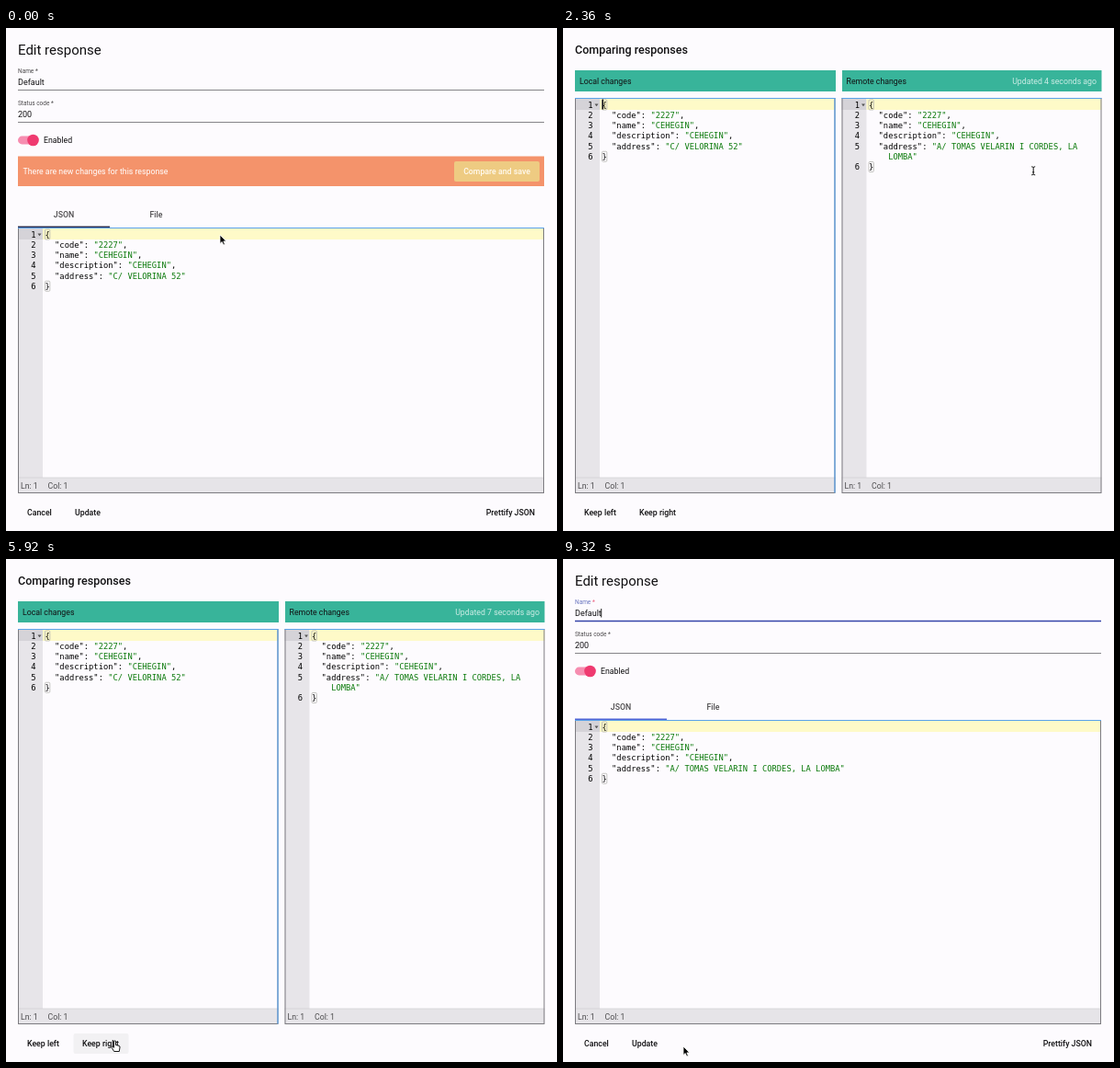
An HTML page for the animation above (9360 ms loop, 600 by 547 pixels).

```html
<!DOCTYPE html>
<html lang="en">
<head>
<meta charset="utf-8">
<title>Compare responses</title>
<style>
  html, body { margin: 0; width: 100%; height: 100%; overflow: hidden; background: #fdfbfe; }
  svg { display: block; width: 100%; height: 100%; }
  text { font-family: Roboto, Arial, sans-serif; font-size: 8.75px; fill: #111012; }
  .code { font-family: "DejaVu Sans Mono", monospace; font-size: 8.79px; fill: #000; }
  .string { fill: #0b7a0b; }
  .strong { font-weight: 500; }
  .sheet { fill: #fdfbfe; filter: drop-shadow(0 6px 9px #0006); }
  .frame { fill: none; stroke: #7c7b80; }
  .glow .frame { stroke: #58aee6; }
  .thumb { fill: #ef3a70; }
  .track { fill: #f68db0; }
  .off .thumb { fill: #fafafa; stroke: #bbb; stroke-width: .5; }
  .off .track { fill: #8f8e92; }
  .focused .nameLabel { fill: #3949ab; }
  .focused .star { fill: #e5264f; }
  .focused .nameLine { stroke: #3443a8; stroke-width: 1.6; }
</style>
</head>
<body>
<svg id="stage" viewBox="0 0 600 547" preserveAspectRatio="none"></svg>
<script>
const LOOP = 9360, OPEN_MS = 150, CLOSE_MS = 75;
const COMPARE_OPEN = 1970, LOADED = 2300, COMPARE_CLOSE = 6420, EDIT_OPEN = 6550, FOCUS = 6900;
const GREEN = '#38b49a', AMBER = '#f0bd72';

const text = (x, y, content, attrs = '') => `<text x="${x}" y="${y}" ${attrs}>${content}</text>`;
const rect = (x, y, w, h, fill, attrs = '') =>
  `<rect x="${x}" y="${y}" width="${w}" height="${h}" fill="${fill}" ${attrs}/>`;
const line = (x1, y, x2, color, attrs = '') =>
  `<path d="M${x1} ${y}H${x2}" stroke="${color}" ${attrs}/>`;
const strong = 'class="strong"', middle = 'text-anchor="middle"', end = 'text-anchor="end"';

// Code is a list of lines; a line starting with "~" continues the one above.
const body = address => ['{', '  "code": "2227",', '  "name": "CEHEGIN",',
  '  "description": "CEHEGIN",', ...address, '}'];
const localCode = body(['  "address": "C/ VELORINA 52"']);
const remoteCode = body(['  "address": "A/ TOMAS VELARIN I CORDES, LA LOMBA"']);
const remoteWrapped = body(['  "address": "A/ TOMAS VELARIN I CORDES, LA', '~    LOMBA"']);

function editor(x, top, right, bottom, lines) {
  const width = right - x, codeX = x + 29.5, advance = 5.29;
  let number = 0;
  let out = rect(x, top, 27, bottom - top, '#e7e5e9') +
    rect(x, top, 27, 12.5, '#d5d3d8') +
    rect(x + 27, top, width - 27, 12.5, '#fefac8');
  lines.forEach((raw, i) => {
    const y = top + 10.1 + i * 11.25, wrapped = raw[0] === '~';
    const source = wrapped ? raw.slice(1) : raw, code = source.trimStart();
    const column = codeX + (source.length - code.length) * advance;
    if (!wrapped) out += text(x + 19.5, y, ++number, `class="code" ${end}`);
    if (code === '{') out += `<path d="M${x + 21.5} ${y - 4}h4l-2 2.6z" fill="#555"/>`;
    if ('{}'.includes(code))
      [...code].forEach((_, k) => out += rect(codeX + k * advance, y - 8.6, 5.3, 11, 'none',
        'rx="1" stroke="#b5b5b0" stroke-width=".8"'));
    const colored = wrapped ? `<tspan class="string">${code}</tspan>`
      : code.replace(/: (".*?)(,?)$/, ': <tspan class="string">$1</tspan>$2');
    out += text(column, y, colored, 'class="code"');
  });
  return out + rect(x, bottom - 16.5, width, 16.5, '#e6e4e8') +
    line(x, bottom - 16.5, right, '#cfcdd2', 'stroke-width=".7"') +
    text(x + 3, bottom - 5, 'Ln: 1', 'fill-opacity=".72"') +
    text(x + 32.5, bottom - 5, 'Col: 1', 'fill-opacity=".72"') +
    rect(x + .5, top, width - 1, bottom - top, 'none', 'class="frame"') +
    line(x, top, right, '#5aa2ea', 'stroke-width="1.2"');
}

// The dialog is slightly larger than the stage, so its edges show only while it is scaled down.
const sheet = rect(-2, -1.5, 604, 550, '', 'class="sheet" rx="3"');

function editScreen(id, top, code, ink, banner) {
  return `<g id="${id}">${sheet}` +
    text(13, 28.8, 'Edit response', 'style="font-size:15px"') +
    text(13, 48.7, 'Name <tspan class="star">*</tspan>',
      'class="nameLabel" style="font-size:6.5px" fill-opacity=".75"') +
    text(13, 62.2, 'Default', 'style="font-size:9px"') +
    line(13, 67.5, 586, '#858488', 'class="nameLine"') +
    text(13, 83.8, 'Status code *', 'style="font-size:6.5px" fill-opacity=".75"') +
    text(13, 97.2, '200', 'style="font-size:9px"') +
    line(13, 102.5, 586, '#858488') +
    rect(13, 117.6, 22, 8.8, '', 'class="track" rx="4.4"') +
    '<circle class="thumb" cx="29.5" cy="122" r="6.3"/>' +
    text(41, 125.2, 'Enabled') + banner +
    text(63, top - 12, 'JSON', `${middle} ${strong} fill-opacity=".75"`) +
    text(163.5, top - 12, 'File', `${middle} ${strong} fill-opacity=".75"`) +
    editor(13, top, 586, 505.5, code) +
    line(13, top - 1.2, 113, ink, 'stroke-width="1.6"') +
    text(23, 530.2, 'Cancel', strong) + text(75, 530.2, 'Update', strong) +
    text(576, 530.2, 'Prettify JSON', `${strong} ${end}`) + '</g>';
}

function compareScreen(id, bottom, remote, extra) {
  return `<g id="${id}">${sheet}` +
    text(13, 28.2, 'Comparing responses', `${strong} style="font-size:12.5px"`) +
    rect(13, 46, 284, 23, GREEN) + rect(304, 46, 282.5, 23, GREEN) +
    text(18, 61, 'Local changes') + text(308.5, 61, 'Remote changes') +
    editor(13, 76.5, 296.5, bottom, localCode) +
    editor(303.5, 76.5, 586.5, bottom, remote) + extra + '</g>';
}

const trash = (x, y) => `<path transform="translate(${x} ${y})" fill="#555"
  d="M-4.5-5h2.5l1-1h2l1 1h2.5v1.3h-9zM-4-3h8v8q0 1-1 1h-6q-1 0-1-1z"/>`;
const badge = (x, y, label, color, width = 22) =>
  rect(x - width / 2, y - 7.5, width, 15, color, 'rx="7.5"') +
  text(x, y + 3, label, `${middle} style="fill:#fff"`);

function page() {
  const blue = '#2c98e4', colors = { get: blue, put: '#5a82ea', post: '#36c192' };
  const rows = [
    [63, 22, '/login'], [111, 96, '/sections/{sectionCod...'],
    [159, 95, '/{storeCode}/sections/{...'], [208, 95, '/{storeCode}/sections/{...', 'put'],
    [256, 99, '/sections/{sectionCode}/observ...'], [317, 95, '/{storeCode}/sections/{section...'],
    [377, 78, '/{sectionCode}/lost-sales-'], [438, 95, '/{storeCode}/sections/{...', 'post'],
    [486, 96, '/sections/{sectionCod...'], [547, 95, '']];
  const list = rows.map(([y, right, path, verb = 'get']) =>
    line(0, y - 16.5, 151, '#ddd') + text(right, y + 17, path, end) +
    badge(verb === 'post' ? 117.5 : 120, y, verb, colors[verb], verb === 'post' ? 27 : 22)).join('');
  return `<g id="page">${rect(0, 0, 600, 547, '#fafafa')}${list}` +
    rect(0, 9, 151, 36.5, '#16a886') +
    rect(-20, 16, 32, 22, AMBER, 'rx="2"') + rect(20, 16, 39, 22, AMBER, 'rx="2"') +
    '<path d="M38 23.5l-4 3.5 4 3.5M42 23.5l4 3.5-4 3.5" fill="none" stroke="#333" stroke-width="1.3"/>' +
    rect(144, 46, 5, 262, '#bbb', 'rx="2"') + '<path d="M151.5 8V547" stroke="#ddd"/>' +
    line(151, 67, 600, '#ccc') +
    text(167, 38, 'Login', 'style="font-size:14.8px"') + badge(225, 33, 'get', blue) +
    '<path d="M248 38v-2.5l7-7 2.5 2.5-7 7zM256 27.500l1.2-1.2 2.5 2.5-1.2 1.2z" fill="#444"/>' +
    trash(279, 33) + text(167, 61, '/bff/api/v1/stores/{storeCode}/login') +
    text(167, 94.5, 'Responses', `${strong} style="font-size:12.4px"`) +
    rect(236, 79, 40, 22, AMBER, 'rx="2"') +
    '<path d="M252 90h8M256 86v8" stroke="#444" stroke-width="1.2"/>' +
    rect(168.5, 111, 267, 54, '#fafafa', 'rx="12" stroke="#2cb795" stroke-width="3"') +
    '<path d="M194 126.5c4 5 7.5 9 7.5 14.5a7.5 8 0 0 1-15 0c0-5.500 3.5-9.500 7.5-14.500z" fill="none" stroke="#222" stroke-width="2"/>' +
    text(212, 134.5, 'Default') + text(212, 148.5, '200', `style="fill:${GREEN}"`) +
    trash(414.5, 138) + rect(0, 0, 600, 547, '#000', 'opacity=".18"') + '</g>';
}

const banner = rect(13, 139.5, 573, 32.5, '#f4936b') +
  text(18.5, 159, 'There are new changes for this response', 'style="fill:#fff"') +
  rect(488, 145, 93, 22, '#eecb82', 'rx="2"') +
  text(534.5, 159.2, 'Compare and save', `${middle} ${strong} style="fill:#fffaf0"`);

const compareExtras =
  text(581, 61, '', `id="updated" ${end} style="fill:#fff;fill-opacity:.75"`) +
  rect(73.5, 516, 60, 22, '#f2f1f3', 'id="hover" rx="2"') +
  text(23, 530.2, 'Keep left', strong) + text(83, 530.2, 'Keep right', strong) +
  '<path d="M296 76.5V505.5" stroke="#5aa2ea" stroke-width="1.2"/>' +
  rect(42.5, 77.5, 1.5, 11, '#111', 'id="codeCaret"');

const outline = 'stroke="#fff" stroke-width=".8" stroke-linejoin="round"';
const pointers = `<g id="pointer">
  <path id="arrow" d="M0 0V9.5L2.2 7.5 3.8 11 5.4 10.3 3.9 6.9H6.8z" fill="#000" ${outline}/>
  <path id="hand" d="M-1 1q0-1.2 1-1.2t1 1.2V4.5l3.5.8q1.2.4 1 1.7L4.8 11.5H-.8L-3.3 7.5q-.5-1.2.5-1.4L-1 7.3z" fill="#fff" stroke="#000" stroke-width=".9" stroke-linejoin="round"/>
  <path id="beam" d="M-2-4.5Q0-4.5 0-3.5V3.5Q0 4.5-2 4.5M2-4.5Q0-4.5 0-3.5M0 3.5Q0 4.5 2 4.5M-1 1.5H1" fill="none" stroke="#111"/></g>`;

document.getElementById('stage').innerHTML = page() +
  editScreen('editBefore', 217.5, localCode, '#2b3052', banner) +
  compareScreen('compareLoading', 533.6, ['{}'], '') +
  compareScreen('compareReady', 505.5, remoteWrapped, compareExtras) +
  editScreen('editAfter', 175.5, remoteCode, '#5266d6',
    rect(41.2, 54, 1, 9.5, '#222', 'id="nameCaret"')) + pointers;

const $ = id => document.getElementById(id);
const show = (id, on) => $(id).style.display = on ? '' : 'none';
const clamp = v => Math.max(0, Math.min(1, v));
const easeOut = v => 1 - (1 - clamp(v)) ** 2.75;
const easeInOut = v => v * v * (3 - 2 * v);

// Screen id, time its dialog opens, time it closes
const screens = [
  ['editBefore', -OPEN_MS, 1840],
  ['compareLoading', COMPARE_OPEN, COMPARE_CLOSE],
  ['compareReady', COMPARE_OPEN, COMPARE_CLOSE],
  ['editAfter', EDIT_OPEN, LOOP]];

// Pointer stops: time, x, y
const route = [[0, 233, 225], [120, 233, 225], [1350, 513, 155], [2040, 513, 155],
  [3300, 508, 157], [4250, 508, 158], [4720, 497, 181], [5560, 118.5, 524],
  [6420, 118.5, 524], [6600, 120, 523], [7300, 118, 522], [8820, 118, 522], [9320, 131, 530]];

function pointerAt(t) {
  const next = route.findIndex(stop => stop[0] > t);
  if (next < 0) return route.at(-1).slice(1);
  const [t0, x0, y0] = route[next - 1], [t1, x1, y1] = route[next];
  const k = easeInOut((t - t0) / (t1 - t0));
  return [x0 + (x1 - x0) * k, y0 + (y1 - y0) * k];
}

function pointerKind(t, x, y) {
  if (t < 1840) return x > 488 && y < 168 ? 'hand' : 'arrow';
  if (t < COMPARE_OPEN || t >= COMPARE_CLOSE) return 'arrow';
  if (y > 516) return x < 134 ? 'hand' : 'arrow';
  return y < 489 ? 'beam' : 'arrow';
}

function render(t) {
  const hidden = t < LOADED ? 'compareReady' : 'compareLoading';
  for (const [id, open, close] of screens) {
    const visible = id !== hidden && t >= open && t < close + CLOSE_MS;
    show(id, visible);
    if (!visible) continue;
    const p = easeOut((t - open) / OPEN_MS);
    const group = $(id);
    group.setAttribute('opacity', p * (1 - clamp((t - close) / CLOSE_MS)));
    group.setAttribute('transform',
      `translate(300 273.5) scale(${.7 + .3 * p}) translate(-300 -273.5)`);
    group.classList.toggle('glow', p < 1);
  }
  show('page', (t > 1840 && t < COMPARE_OPEN + OPEN_MS) ||
    (t > COMPARE_CLOSE && t < EDIT_OPEN + OPEN_MS));

  $('editAfter').classList.toggle('off', t < 6640);
  $('editAfter').classList.toggle('focused', t >= 6700);
  show('nameCaret', t >= FOCUS && (t - FOCUS) % 1000 < 500);
  show('codeCaret', (t + 700) % 1000 < 500);
  $('updated').textContent = `Updated ${4 + Math.floor((t - LOADED) / 1000)} seconds ago`;

  const [x, y] = pointerAt(t), kind = pointerKind(t, x, y);
  show('hover', kind === 'hand' && x > 73);
  $('pointer').setAttribute('transform', `translate(${x} ${y})`);
  for (const id of ['arrow', 'hand', 'beam']) show(id, id === kind);
}

const start = performance.now();
function tick() {
  render((performance.now() - start) % LOOP);
  requestAnimationFrame(tick);
}
tick();
</script>
</body>
</html>
```
